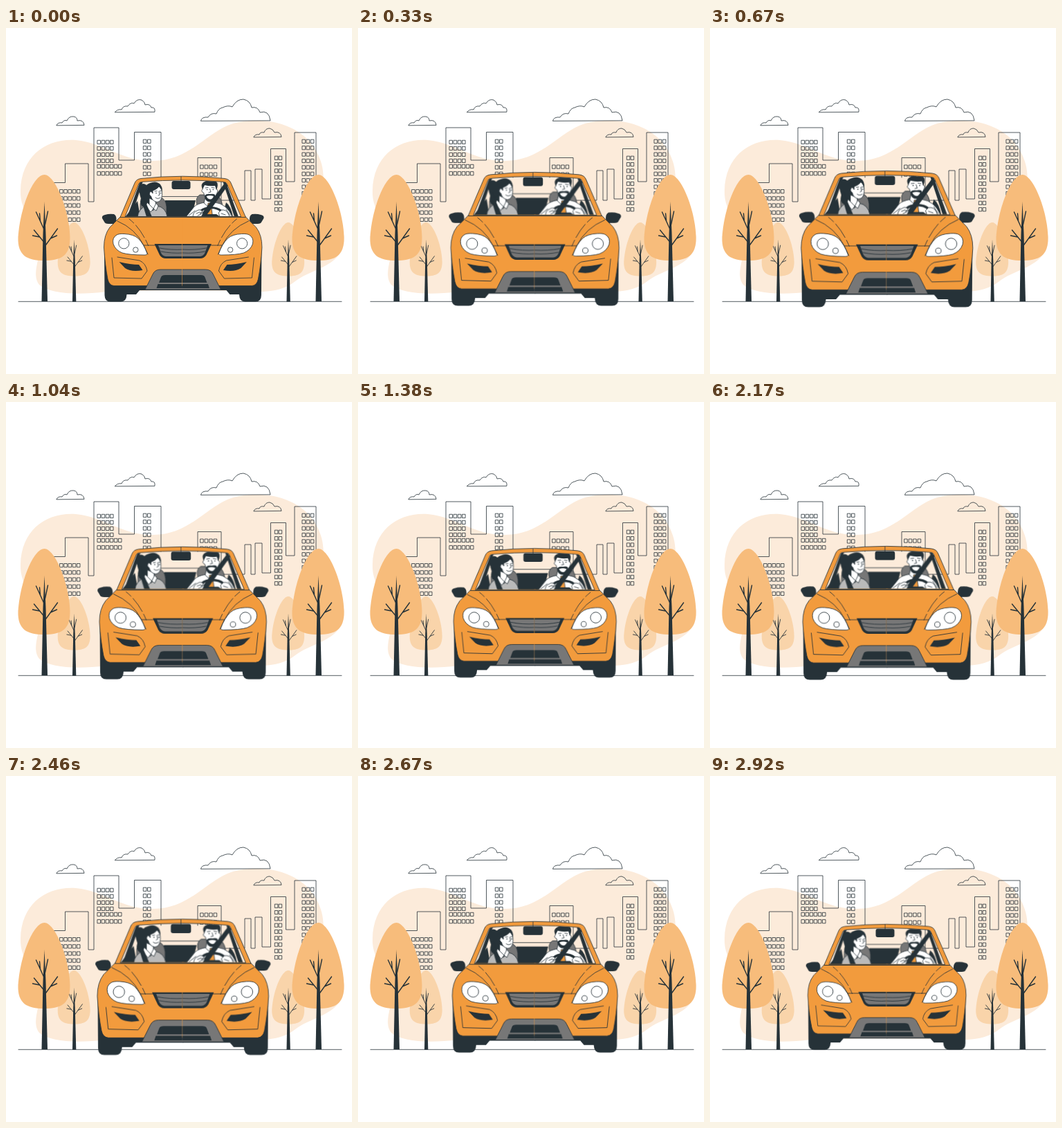
Animation of 500 by 500 pixels, one loop 2960 ms. Source, as an HTML page:

```html
<!DOCTYPE html>
<html lang="en">
<head>
<meta charset="utf-8">
<title>City drive</title>
<style>
  html, body { margin: 0; width: 100%; height: 100%; overflow: hidden; background: #fff; }
  svg { display: block; width: 100vw; height: 100vh; }
  .line { fill: none; stroke: #263238; stroke-width: .8; stroke-linejoin: round; stroke-linecap: round; }
  .dash { stroke-dasharray: 9 4 22 4; }
  .dark { fill: #263238; }
  .grey { fill: #777; }
  .orange { fill: #f29b3d; }
  .white { fill: #fff; }
  .edge { stroke: #263238; stroke-width: .8; stroke-linejoin: round; }
  #car { transform-origin: 255.7px 304px; animation: pulse 2960ms linear infinite; }
  @keyframes pulse {
    0%, 99% { transform: scale(1); }
    17.2% { transform: scale(1.099); }
    58.8% { transform: scale(1.001); }
    80.6% { transform: scale(1.097); }
  }
</style>
</head>
<body>
<svg viewBox="0 0 500 500">
  <defs>
    <g id="tree">
      <path d="M0 0C-16 0-35 47-38 90C-39 117-25 124-1 124C25 124 37 117 37 91C36 50 15 0 0 0Z"/>
      <path class="dark" d="M0 39L2 85L4.500 183H-4L-2 85Z"/>
      <path fill="none" stroke="#263238" stroke-width="1.400" stroke-linecap="round" d="M-1 78L-12 54M-6 67L-7 56M1 72L5 53M-1 97L-15 80M-7 90L-17 88M1 103L19 78M9 92L18 88"/>
    </g>
    <clipPath id="glass"><path d="M191.500 223Q255 217 320 223L341 273H170Z"/></clipPath>

    <g id="half">
      <path class="dark" d="M142 316L142.500 386Q142.500 395.500 151 395.500H166Q174 395.500 174.500 385H188L193 379H256V316Z"/>
      <path class="dark" d="M159 280Q161 272 156 269Q149 268 143 270Q138 271 139 275L142 280Q143 283 148 283H156Z"/>
      <path class="orange" d="M257 272H166L150 288Q141.500 299 141.500 317Q143 342 147 363Q149 372 156 372.500H257Z"/>
      <path class="line" d="M166 272L150 288Q141.500 299 141.500 317Q143 342 147 363Q149 372 156 372.500H207"/>
      <path class="line" d="M161 279Q187 290 199 314H216M199 314L205 327"/>
      <path class="line dash" d="M178 276Q196 290 207 318"/>
      <path class="white edge" d="M160 299Q163 297 171 297.500Q184 298 191 304Q199 312 204 326Q204 328 200 328Q178 328 168 325Q158 321 155 312Q153 303 160 299Z"/>
      <circle class="white edge" cx="170.300" cy="311.300" r="7.600"/>
      <circle class="white edge" cx="187.300" cy="320.500" r="3.700"/>
      <path class="line" d="M153 332L156 361L196 362L204 351Q202 340 193 336L161 331"/>
      <path class="dark" d="M163.500 338Q180 342 192 342L197.500 350Q181 353 172 347Z"/>
      <path class="dark" d="M214.500 312H256.500V333H231Q225 333 222 328Z"/>
      <path class="grey" d="M220 314H256.500V330H231Q226 329.500 224 325Z"/>
      <path class="line" d="M222 318Q238 321 256 320M224 323Q239 326 256 325"/>
      <path class="grey" d="M256.500 349H223Q215 349 212 356L201 378H256.500Z"/>
      <path class="line" d="M256 349H223Q215 349 212 356L201 378H256"/>
      <path class="dark" d="M221 368L224 360Q225 357 230 357H256.500V368ZM219.500 370H256.500V376H217.500Z"/>
    </g>
  </defs>

  <path fill="#fcebda" d="M21 235C22 185 58 159 101 162C143 166 165 192 212 192C262 192 286 156 320 141C343 132 378 131 404 141C430 151 447 168 455 193C463 217 454 242 469 264C487 284 493 304 486 319C475 346 438 350 418 366C404 377 389 380 371 381C285 379 203 379 145 381C105 386 65 385 48 371C35 354 53 328 49 303C45 277 20 270 21 235Z"/>

  <g class="line">
    <path d="M68 223.500H85.500V196H119V251H127V144H163V191H185.500V150.500H224V216M277 216V187.500H311V249H345V206H354V249H360V204H370V247H382.500V174.500H404.500V222H417V151H448V213"/>
    <path d="M281.500 134Q283 128 292 129Q296 122 304 124Q307 116 313 115Q321 111 327 114Q333 103 343 103Q353 105 355 115Q364 113 367 122Q380 118 382 133.500Z"/>
    <path d="M157.500 121.500Q161 117 167 118Q169 112 176 113Q180 107 185 109Q189 102 196 104Q201 107 201 111Q208 109 210 115Q216 114 215 121Z"/>
    <path d="M73 140.500Q75 136 81 137Q84 132 88 134Q91 127 98 128Q103 129 103 134Q112 132 113 140Z"/>
    <path d="M358 157.500Q360 153 366 154Q367 150 373 151Q375 145 381 145Q386 146 388 151Q397 149 398 157Z"/>
    <g id="panes"></g>
    <path d="M18 395.300H485"/>
  </g>

  <g fill="#f9d4aa">
    <use href="#tree" transform="translate(98.500 281) scale(.625)"/>
    <use href="#tree" transform="translate(408 281) scale(.625)"/>
  </g>
  <g fill="#f7bc7b">
    <use href="#tree" transform="translate(55.500 212)"/>
    <use href="#tree" transform="translate(451.500 212)"/>
  </g>

  <g id="car">
    <g clip-path="url(#glass)">
      <path class="line" d="M224 243.500H280"/>
      <path class="dark" d="M230 249H274L268 273H228ZM194 221L198 221L181 273H175ZM313 221L317 221L336 273H330Z"/>
      <path class="dark" d="M176 268L190 250L194 273H172ZM318 252Q325 257 328 273H312Z"/>
      <path class="grey edge" d="M194 273V254Q197 244 207 243H220Q231 246 232 258V273ZM276 256Q273 245 280 241H304Q313 246 313 262Z"/>

      <!-- passenger -->
      <path class="dark" d="M208 224Q217 220 223 226Q228 233 224 241L216 253Q207 264 196 257Q192 251 196 244Q190 237 193 229Q197 222 203 227Q205 225 208 224Z"/>
      <path class="white edge" d="M207 246L207 263L217 260L216 250Z"/>
      <path class="white edge" d="M212 235Q218 233 221 229Q226 233 225.500 241Q225 251 218 251.500Q211 250 209.500 243Q206 241 208 237Q210 235 212 239Z"/>
      <path class="line" d="M221 236L222 241L220 242M215 236L218 235.500M222 235.500H224M216 245Q219 248 223 245"/>
      <circle class="dark" cx="217" cy="238.500" r=".8"/><circle class="dark" cx="223.500" cy="238.500" r=".8"/>
      <path class="edge" fill="#bababa" d="M190 273Q191 261 204 256L212 264L218 257Q231 259 233 273Z"/>
      <path class="white edge" d="M204 252L202 257L209 266L213 261ZM217 253L213 261L217 264L220 257Z"/>
      <path class="dark" d="M193 240L198 243L211 273H203Z"/>

      <!-- driver -->
      <path class="white edge" d="M260 273L272 258Q276 254 287 252H302Q319 254 327 273Z"/>
      <path class="white edge" d="M288 244L286 253L293 259L301 253L300 244Z"/>
      <path class="orange edge" d="M292 253H296L298 269L294 273L290 269Z"/>
      <path class="white edge" d="M285 227Q293 222 303 227L304 233Q307 234 305 238L302 246Q294 252 288 246L285.500 238Q281 236 284 233Z"/>
      <path class="dark" d="M284 233Q280 225 287 222Q295 217 303 221Q308 225 304 234L302 228Q294 229 287 227Z"/>
      <path class="dark" d="M287 242Q290 239 295 240Q300 239 302 241Q303 251 295 251.500Q287 251 287 242Z"/>
      <path class="white" d="M289.500 243Q295 241 300 243Q298 247.500 295 247.500Q291 247 289.500 243Z"/>
      <path class="line" d="M288 231L292 230.500M297 230.500L301 231M294.500 232.500L296 237L293 237.500"/>
      <circle class="dark" cx="290.500" cy="233.500" r=".8"/><circle class="dark" cx="299.300" cy="233.500" r=".8"/>
      <path class="dark" d="M316 224L321 227L288 273H279Z"/>
      <path d="M276 278Q277 260 296 259.500Q315 260 317 278" fill="none" stroke="#263238" stroke-width="3.200"/>
      <path class="dark" d="M285 273L290 269H304L310 273Z"/>
      <path class="white edge" d="M270 273Q270 266 276 264Q280 261 284 265L280 268L285 267L282 273ZM309 273L307 267L311 263Q318 262 321 268L323 273Z"/>
      <path class="line" d="M275 268L280 266M277 271L282 269M311 268L317 270M264 271L273 264M318 262L324 271"/>
    </g>

    <use href="#half"/>
    <use href="#half" transform="translate(511.400) scale(-1 1)"/>
    <path class="orange edge" fill-rule="evenodd" d="M165 273.500L186 224Q188 218.500 195 217.500Q255 211 316 217.500Q323 218.500 325 224L346.400 273.500ZM172 272.500H339.500L319 225Q318 222.500 313 222.300Q255 217.500 198 222.300Q193 222.500 192 225Z"/>
    <path class="line" d="M253 215V221"/>
    <rect class="dark" x="239.500" y="221" width="27" height="12" rx="3"/>
  </g>
</svg>
<script>
  // x, y, columns, rows, column step, row step
  const blocks = [
    [78, 233.5, 5, 5, 6.2, 10.2],
    [132.3, 162.3, 4, 4, 6.2, 9],
    [132.3, 197.3, 6, 2, 6.1, 10.3],
    [198.7, 161.2, 2, 6, 6.2, 9.4],
    [281, 198, 4, 2, 6.5, 11],
    [388.7, 185.2, 2, 9, 5.8, 9.3],
    [428.3, 161.2, 3, 9, 6.2, 9.4]
  ];
  let d = '';
  for (const [x, y, cols, rows, dx, dy] of blocks)
    for (let r = 0; r < rows; r++)
      for (let c = 0; c < cols; c++)
        d += `M${x + c * dx} ${y + r * dy}h4.200v5.200h-4.200z`;
  document.getElementById('panes').innerHTML = `<path d="${d}"/>`;
</script>
</body>
</html>
```
